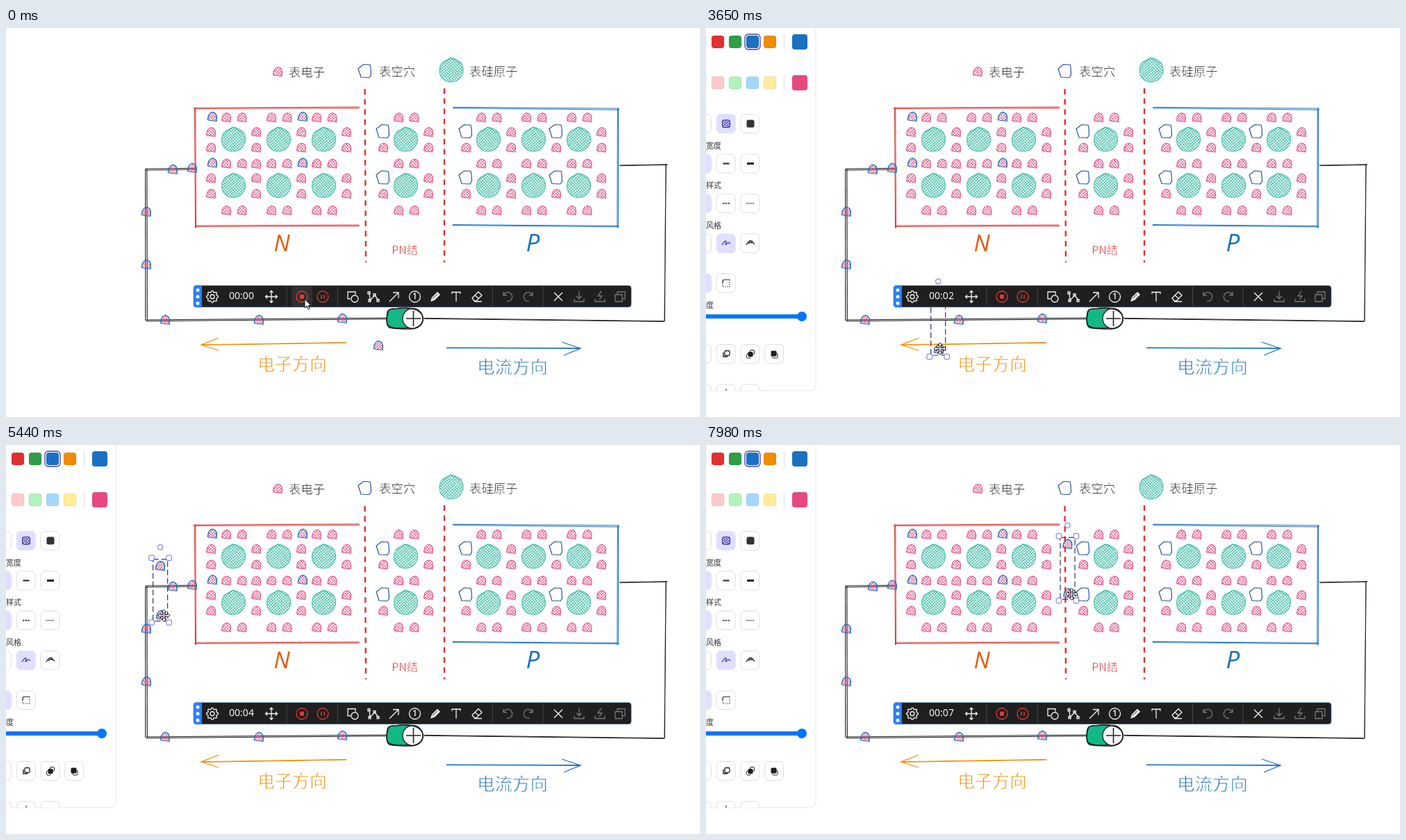
An HTML page with a canvas for the animation above (8 s loop, 999 by 561 pixels).

```html
<!DOCTYPE html>
<html lang="zh">
<head>
<meta charset="utf-8">
<style>
  html, body { margin: 0; width: 100%; height: 100%; overflow: hidden; background: #fff; }
  canvas { display: block; }
</style>
</head>
<body>
<canvas id="stage" width="999" height="561"></canvas>
<script>
const view = document.getElementById('stage').getContext('2d');
const PINK = '#e64980', BLUE = '#1971c2', GREEN = '#12b886', TEAL = '#1fb09a', RED = '#e03131',
      ORANGE = '#f08c00', INK = '#1e1e1e', VIOLET = '#6965db', INDIGO = '#4440a8',
      LILAC = '#e0dfff', EDGE = '#dedee3', BAR = '#1f1f20';
const CJK = '"Noto Sans CJK SC", "Noto Sans CJK", sans-serif';
let g = view, seed = 7;

const rand = () => (seed = seed * 16807 % 2147483647) / 2147483647;
const jit = a => (rand() * 2 - 1) * a;

function at(x, y, draw) {
  g.save();
  g.translate(x, y);
  draw();
  g.restore();
}
function stroke(d, color, w = 1.3) {
  g.strokeStyle = color;
  g.lineWidth = w;
  g.stroke(new Path2D(d));
}
function fill(d, color) {
  g.fillStyle = color;
  g.fill(new Path2D(d));
}
function dashed(pattern, draw) {
  g.setLineDash(pattern);
  draw();
  g.setLineDash([]);
}
function box(x, y, w, h, r, color, edge, lw = 1) {
  g.beginPath();
  g.roundRect(x, y, w, h, r);
  if (color) { g.fillStyle = color; g.fill(); }
  if (edge) { g.strokeStyle = edge; g.lineWidth = lw; g.stroke(); }
}
function disc(x, y, r, color, edge, lw = 1) {
  box(x - r, y - r, 2 * r, 2 * r, r, color, edge, lw);
}
function text(s, x, y, font, color, align = 'left') {
  g.font = font;
  g.fillStyle = color;
  g.textAlign = align;
  g.textBaseline = 'middle';
  g.fillText(s, x, y);
}
// Text with a white rim that thins it to a pen line
function penText(s, x, y, size, color, align) {
  text(s, x, y, `300 ${size}px ${CJK}`, color, align);
  g.strokeStyle = '#fff';
  g.lineWidth = size / 32;
  g.strokeText(s, x, y);
}
// A pen line drawn twice, side by side
function sketch(x1, y1, x2, y2, color, w = 1, gap = .8) {
  const len = Math.hypot(x2 - x1, y2 - y1);
  const nx = (y1 - y2) / len * gap, ny = (x2 - x1) / len * gap;
  g.strokeStyle = color;
  g.lineWidth = w;
  for (const side of [-1, 1]) {
    g.beginPath();
    g.moveTo(x1 + side * nx + jit(.4), y1 + side * ny + jit(.4));
    g.lineTo(x2 + side * nx + jit(.4), y2 + side * ny + jit(.4));
    g.stroke();
  }
}
function hatch(d, r, gap, color, w) {
  g.save();
  g.clip(new Path2D(d));
  g.strokeStyle = color;
  g.lineWidth = w;
  for (const turn of [-.72, .85]) {
    g.save();
    g.rotate(turn);
    g.beginPath();
    for (let p = -r; p <= r; p += gap) {
      g.moveTo(-r, p + jit(.4));
      g.lineTo(r, p + jit(.4));
    }
    g.stroke();
    g.restore();
  }
  g.restore();
}

const DOME = 'M-6.5 4Q-5.5-6 .5-6.5Q6-5.5 6.5 0L6 6.5L-5.5 5Z';
const ATOM = 'M-1-18Q8-17 14-11Q18-5 17 2Q15 11 8 15Q-1 19-9 15Q-17 10-17 1Q-17-8-12-12Z';
const HOLE = 'M-9-3.5L-1.5-9.5L8-9L9-4L9.5 5.5L7 9.5L-5 9Z';

function electron(x, y, edge = PINK) {
  at(x, y, () => {
    hatch(DOME, 9, 2.9, PINK, .8);
    stroke(DOME, edge, 1.1);
    if (edge === BLUE) stroke('M-7 5Q-6-7 1-7Q7-4 6 6', BLUE, .8);
  });
}
function atom(x, y) {
  at(x, y, () => {
    fill(ATOM, '#eaf8f5');
    hatch(ATOM, 20, 3, TEAL, .75);
    stroke(ATOM, TEAL, .8);
    stroke('M-15-9L-1-18L13-10', TEAL, .7);
  });
}
const hole = (x, y) => at(x, y, () => stroke(HOLE, '#2450a4', 1.2));

// Atoms in a row share the electrons between them. Every second gap holds
// a spare electron above it (kind "n") or a hole in place of one (kind "p").
function lattice(left, cols, kind) {
  const pitch = 65;
  for (const y of [161, 227.5]) {
    for (let i = 0; i <= cols; i++) {
      const x = left + i * pitch, even = i % 2 === 0;
      if (kind === 'p' && even) hole(x - 1, y - 12);
      else electron(x, y - 11);
      electron(x, y + 11.5);
      if (kind === 'n' && even) electron(x + 2, y - 33, BLUE);
    }
    for (let i = 0; i < cols; i++) {
      const x = left + (i + .5) * pitch;
      atom(x, y);
      for (const dx of [-10.5, 12]) {
        electron(x + dx, y - 32);
        if (y > 200) electron(x + dx, y + 35.5);
      }
    }
  }
}

function drawScene() {
  g.fillStyle = '#fff';
  g.fillRect(0, 0, 999, 561);

  electron(391, 63);
  hole(516, 62);
  atom(641, 61);
  penText('表电子', 407, 63, 17.4, INK);
  penText('表空穴', 537, 62, 17.4, INK);
  penText('表硅原子', 667, 62, 17.4, INK);

  sketch(270, 116, 509, 115, RED);
  sketch(272, 115, 273, 288, RED);
  sketch(272, 286, 509, 285, RED);
  sketch(643, 115, 883, 117, BLUE);
  sketch(881, 116, 881, 288, BLUE);
  sketch(643, 284, 882, 286, BLUE);
  dashed([8, 6.6], () => stroke('M516.5 88L518 338M631 87V338', RED, 2.4));

  lattice(295, 3, 'n');
  lattice(543, 1, 'p');
  lattice(662, 3, 'p');
  electron(360, 196);

  sketch(272, 203, 201, 204, INK);
  sketch(202, 203, 202, 422, INK, 1.1, 1);
  sketch(202, 422, 549, 419, INK);
  sketch(883, 198, 952, 197, INK, .9, .4);
  sketch(950, 197, 948, 423, INK, .9, .4);
  sketch(948, 423, 602, 419, INK, 1, .5);
  for (const [x, y] of [[240, 204], [268, 202], [202, 265], [202, 341], [229, 421], [364, 421], [484, 419]])
    electron(x, y, BLUE);

  box(549, 405, 51, 28, [7, 14, 14, 7], GREEN);
  disc(585.5, 419, 14.5, '#fff', INK, 1.3);
  stroke('M549 411Q550 404 560 405Q580 402 592 407Q602 413 600 422Q598 432 583 434Q560 434 552 432Q546 428 549 411', INK, 1.7);
  stroke('M551 407Q547 416 549 428Q556 435 580 432', INK, 1.1);
  stroke('M576 419H597M586.5 408V430', INK, 1.6);

  sketch(490, 454, 281, 457, ORANGE, 1, .5);
  stroke('M306 447L281 457L306 465', ORANGE, 1.3);
  sketch(634, 461, 827, 462, BLUE, 1, .5);
  stroke('M800 453L827 462L803 472', BLUE, 1.3);
  penText('电子方向', 362, 484, 25, ORANGE);
  penText('电流方向', 678, 488, 25.5, BLUE);
  penText('PN结', 574, 320, 16, RED, 'center');
  text('N', 397, 313.5, 'italic 33px "Open Sans", sans-serif', '#e8590c', 'center');
  text('P', 758.5, 312.5, 'italic 35px "Open Sans", sans-serif', BLUE, 'center');
}

function swatches(y, colors, big) {
  ['#fff', ...colors].forEach((c, i) => box(25 * i - 17, y - 9, 18, 18, 4, c, 'rgba(0,0,0,.12)', .6));
  stroke(`M112.5 ${y - 11}v22`, EDGE, 1);
  box(124, y - 11, 22, 22, 4, big);
}
// One line of panel buttons; "on" is the index of the chosen one
function buttons(y, count, on = -1) {
  for (let i = 0; i < count; i++) {
    const lit = i === on && LILAC;
    box(34.7 * i - 19.5, y - 13.5, 27, 27, 6, lit || '#fff', lit || EDGE);
  }
}
const mark = (x, y, d, w = 1.3, color = INK) => at(x, y, () => stroke(d, color, w));

function drawPanel() {
  g.save();
  box(-40, -20, 198, 543, 8, '#fff', '#e6e6ea');
  g.clip();
  swatches(20, ['#e03131', '#2f9e44', BLUE, ORANGE], BLUE);
  box(56, 9, 22, 22, 5, null, INDIGO, 1.3);
  swatches(79, ['#ffc9c9', '#b2f2bb', '#a5d8ff', '#ffec99'], PINK);
  ['背景', '填充', '描边宽度', '边框样式', '线条风格', '边角', '透明度', '图层', '操作']
    .forEach((s, i) => text(s, -22, 54 + 57.7 * i - (i > 6 ? 14 : 0), '11px ' + CJK, '#333'));
  [1, 0, 0, 1, 0].forEach((on, i) => buttons(138 + 57.5 * i, i < 4 ? 3 : 2, on));
  buttons(470, 4);
  buttons(527.5, 3);

  at(29, 138, () => hatch('M-5-5H5V5H-5Z', 8, 2.6, INDIGO, .9));
  box(23.5, 132.5, 11, 11, 3, null, INDIGO, 1.2);
  box(58.5, 132.5, 11, 11, 2.5, '#333');
  mark(29, 195.5, 'M-4.5 0H4.5', 1.8);
  mark(64, 195.5, 'M-5 0H5', 3);
  dashed([2.6, 1.2], () => mark(29, 253, 'M-5 0H5', 1.6));
  dashed([1.2, 1.2], () => mark(64, 253, 'M-6 0H6'));
  mark(29, 310, 'M-6 3Q-1-5 0-2Q-2 5 1 1Q3-2 6 1', 1.3, INDIGO);
  mark(64, 310, 'M-6 3Q-2-5 2-3Q4-2 1 0M-3 1Q2-4 6 2');
  mark(29, 368, 'M-5 0V-2Q-5-5-2-5H5', 1.2);
  dashed([1.3, 1.7], () => mark(29, 368, 'M5-5V5H-5V0', 1.2));

  box(-22, 413, 166, 6, 3, '#0075ff');
  disc(138, 416, 7, '#0075ff');

  box(27, 465.5, 7, 7, 1.5, '#fff', INK, 1.3);
  mark(25, 468, 'M0 0V6H6', 1.4);
  box(58.5, 470, 6, 6, 1.5, '#fff', INK);
  box(63.5, 464.5, 6, 6, 1.5, '#fff', INK);
  box(60.5, 467, 7, 7, 1.5, INK);
  box(96, 469, 7, 7, 1.5, '#fff', INK);
  box(93.5, 465.5, 8, 8, 1.5, INK);
  mark(29, 520, 'M0 0V6', 1);
  g.restore();
}

const WHITE = '#f2f2f2', DIM = '#777', ALARM = '#e5392f';
const ARROWS = 'M-8.5 0H8.5M0-8.5V8.5M-6-2.5L-8.5 0L-6 2.5M6-2.5L8.5 0L6 2.5M-2.5-6L0-8.5L2.5-6M-2.5 6L0 8.5L2.5 6';
const icons = [
  [382, ARROWS, WHITE],
  [499, 'M-3 3H-7V-7H4V-3M8 3A5 5 0 1 1-2 3A5 5 0 1 1 8 3', WHITE],
  [529, 'M-6-5L-5 5L2-2L7 5M-8-7h3v3h-3ZM-7 4h3v3h-3ZM0-4h3v3h-3ZM5 4h3v3h-3Z', WHITE],
  [559, 'M-7 7L6-6M-2-6H6V2', WHITE],
  [648, 'M-6-4V-6.5H6V-4M0-6.5V7', WHITE],
  [678, 'M-7 2L2-7L7-2L-1 6H-4ZM-3-2L3 3M-4 7H7', WHITE],
  [722, 'M-6-7V-2H-1M-6-2A6.5 6.5 0 1 1-1 6.5', DIM],
  [752, 'M6-7V-2H1M6-2A6.5 6.5 0 1 0 1 6.5', DIM],
  [795, 'M-6-6L6 6M6-6L-6 6', WHITE],
  [825, 'M0-8V3M-4-1L0 3L4-1M-7 3V7H7V3', DIM],
  [855, 'M2-8L-3-1H3L-1 4M-7 3V7H7V3', DIM],
  [884, 'M-7-3H3V7H-7ZM-4-3V-7H7V3H3', DIM]
];
function drawGear(x, y) {
  g.beginPath();
  for (let i = 0; i <= 64; i++) {
    const a = i * Math.PI / 32, r = 7.5 + Math.max(-.9, Math.min(.9, 2 * Math.cos(8 * a)));
    g.lineTo(x + r * Math.cos(a), y + r * Math.sin(a));
  }
  g.strokeStyle = WHITE;
  g.lineWidth = 1.3;
  g.stroke();
  disc(x, y, 3, null, WHITE, 1.3);
}
function drawToolbar(clock, hover) {
  box(270, 371.5, 630, 31, 4, BAR, '#3b78b8', .7);
  box(270, 371.5, 12, 31, [4, 0, 0, 4], '#2a7fff');
  for (const y of [378, 387.5, 397]) disc(276, y, 2.5, '#fff');
  if (hover) box(411, 372.5, 30, 29, 2, '#303030');
  for (const x of [404, 477.5, 700.5, 773]) stroke(`M${x} 372.5v29`, '#444', 1);

  drawGear(297, 387.5);
  text(clock, 321, 387.5, '14.1px "Open Sans", sans-serif', '#fff');
  for (const x of [426, 456]) disc(x, 387.5, 8, null, ALARM, 1.3);
  box(423, 384.5, 6, 6, 1, ALARM);
  stroke('M454 384.5v6M458 384.5v6', ALARM, 1.5);
  for (const [x, d, c] of icons) mark(x, 387.5, d, 1.3, c);
  disc(588.5, 387.5, 8, null, WHITE, 1.3);
  text('1', 588.5, 388, '600 12px "Open Sans", sans-serif', WHITE, 'center');
  at(618, 387.5, () => {
    fill('M-7 7L-5 1L3-7L7-3L-1 5Z', WHITE);
    stroke('M-4 3L3-4', BAR, 1);
  });
}

function drawSelection(x, y) {
  dashed([8, 4], () => box(x - 10.5, y - 44.5, 21, 89, 0, null, '#32317a', 1.2));
  for (const sx of [-12.5, 12.5]) for (const sy of [-46.5, 46.5])
    box(x + sx - 3.8, y + sy - 3.8, 7.6, 7.6, 2, '#fff', VIOLET);
  disc(x, y - 62, 3.8, '#fff', VIOLET);
}
function drawPointer(x, y) {
  const d = 'M0 0V12.5L3 9.8L5 14.5L7 13.6L5 9.2H9Z';
  at(x, y, () => {
    fill(d, '#fff');
    stroke(d, '#000', .9);
  });
}
function drawMover(x, y) {
  const arm = 'M1.2-1.2V-5H3.4L0-8.6L-3.4-5H-1.2V-1.2';
  at(x, y, () => {
    for (let i = 0; i < 4; i++) {
      fill(arm, '#fff');
      stroke(arm, '#111', 1);
      g.rotate(Math.PI / 2);
    }
  });
}

const mix = (a, b, k) => a + (b - a) * Math.max(0, Math.min(1, k));
// Position on a route of [time, x, y] points
function track(route, t) {
  const i = Math.max(1, route.findIndex(p => p[0] >= t));
  const [t0, x0, y0] = route[i - 1], [t1, x1, y1] = route[i];
  const k = (t - t0) / (t1 - t0);
  return [mix(x0, x1, k), mix(y0, y1, k)];
}
const approach = [[190, 430, 391], [900, 521, 442], [1000, 521, 442], [1280, 530, 455],
  [1450, 530, 455], [1630, 536, 457], [8000, 536, 457]];
const drag = [[2520, 535, 422], [3310, 402, 430], [4130, 239, 424], [4900, 204, 300],
  [5350, 206, 211], [5740, 275, 204], [5960, 328.5, 199.5], [6570, 377, 197],
  [7120, 429, 174], [7270, 429, 174], [7600, 470, 166], [8000, 523, 178.5]];
const ticks = [1450, 2580, 3690, 4760, 5800, 6850, 7880];

const backdrop = document.createElement('canvas');
backdrop.width = 999;
backdrop.height = 561;
g = backdrop.getContext('2d');
drawScene();
g = view;

function frame(now) {
  const t = now % 8000;
  seed = 99;
  const [x, y] = track(drag, t);
  const grip = (t - 2520) / 3400;
  const [cx, cy] = t < 2520 ? track(approach, t) : [x + mix(1, 6, grip), y + mix(34, 37, grip)];

  g.drawImage(backdrop, 0, 0);
  electron(x, y - 35, BLUE);
  electron(x + 1, y + 36, BLUE);
  if (t >= 1990) {
    drawSelection(x, y);
    drawPanel();
  }
  drawToolbar('00:0' + ticks.filter(k => t >= k).length, cx < 441 && cy < 403 && t < 900);
  (t < 1150 ? drawPointer : drawMover)(cx, cy);
  requestAnimationFrame(frame);
}
requestAnimationFrame(frame);
</script>
</body>
</html>
```
